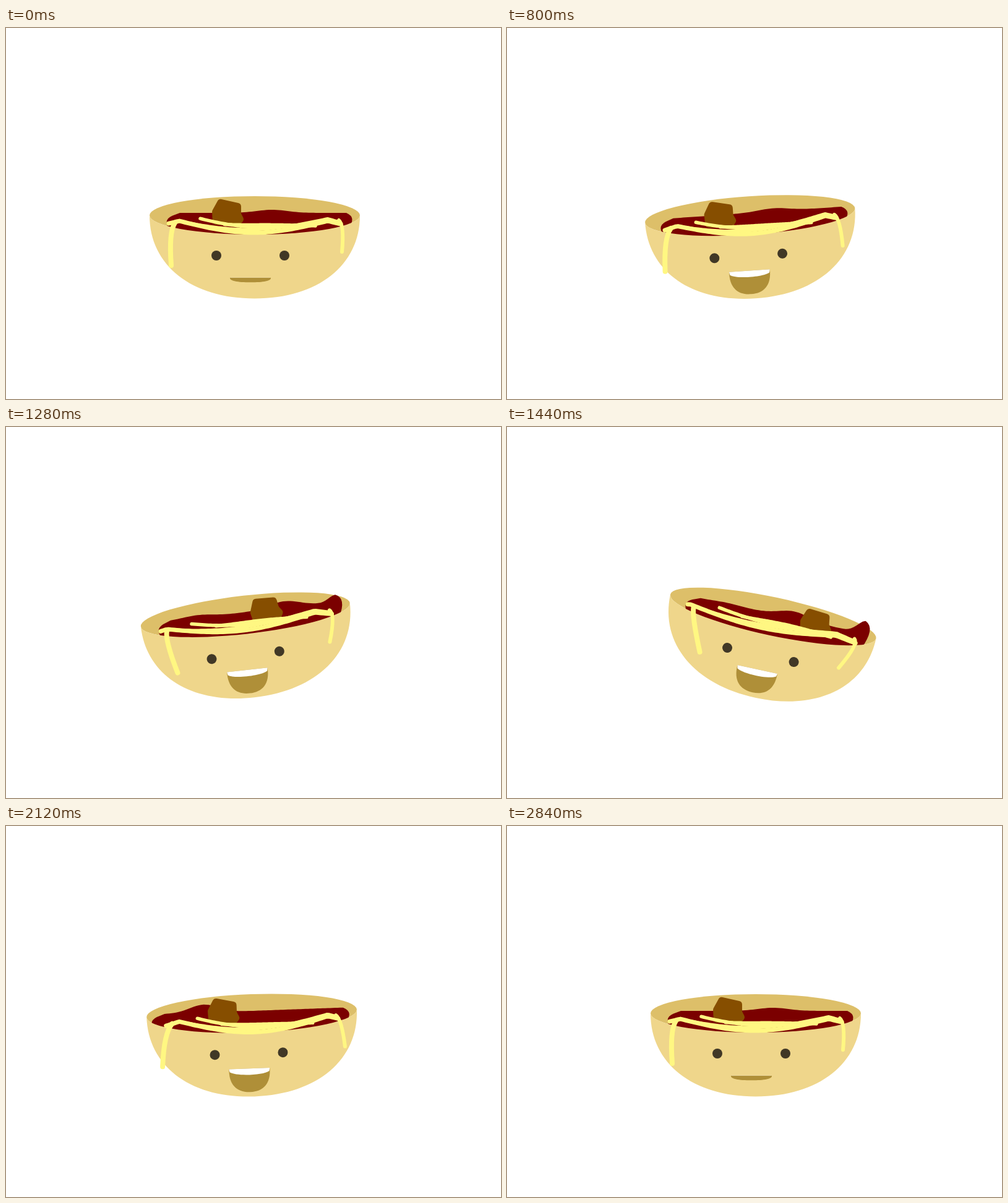
Recreate the animation shown at these times as an HTML page with a canvas. Size 800 px wide and 600 px high, loop 2880 ms.

```html
<!DOCTYPE html>
<html lang="en">
<head>
<meta charset="utf-8">
<title>Noodle bowl</title>
<style>
html, body { margin: 0; width: 100%; height: 100%; overflow: hidden; background: #fff; }
canvas { display: block; }
</style>
</head>
<body>
<canvas id="stage" width="800" height="600"></canvas>
<script>
const ctx = document.getElementById('stage').getContext('2d');
const LOOP = 2880, STEP = 40;
const PIVOT = { x: 400, y: 438 };
const BOWL = { x: 402, y: 303, rx: 170, rim: 31, depth: 134.5, roundness: 0.6 };

// Rocking in degrees at each turning point
const TILT = [[0, 0], [560, 0], [810, -3.95], [1020, 6.2], [1225, -9.5], [1450, 12.2], [1630, -8.6],
  [1815, 7], [2052, -3.9], [2252, 3.1], [2450, -1.8], [2640, 0.8], [2800, 0], [LOOP, 0]];
const MOUTH = [[0, 0], [320, 0], [600, 1], [2520, 1], [2800, 0], [LOOP, 0]];

// The contents trail behind the bowl: wave heights, shift of the meat, swing of the loose ends
const REST = { edge: 259, left: 0, hump: 5, humpX: 430, splash: 0, meat: 0, spin: 0, swing: 0 };
const SLOSH = [
  [0, REST], [480, REST],
  [800, { ...REST, edge: 256, humpX: 440, meat: -5, swing: -8 }],
  [1080, { ...REST, left: 7, hump: 10, humpX: 514, meat: 26, spin: -14, swing: -6 }],
  [1440, { ...REST, left: 2, hump: 11, humpX: 434, splash: 20, meat: 113, spin: -8, swing: 31 }],
  [1720, { ...REST, edge: 241, left: 7, hump: 4, splash: 13, meat: 39, spin: 28, swing: -10 }],
  [2120, { ...REST, edge: 239, left: 13, hump: 0, meat: -2, swing: -12 }],
  [2760, REST], [LOOP, REST]];

// Each strand: ends in x, then how far it lies above the sagging main strand
const STRANDS = [
  { from: 263, to: 541, start: 0, middle: 0, end: 0, width: 7 },
  { from: 290, to: 535, start: 0, middle: 4, end: 3, width: 5 },
  { from: 314, to: 528, start: 12, middle: 2, end: 0, width: 5.5 },
  { from: 353, to: 500, start: 10, middle: 8, end: -3, width: 5.5 }];
const CHUNK = [[-24, 20], [-25, -2], [-14, -22], [22, -14], [22, 2], [27, 12], [20, 21]];

const mix = (a, b, u) => a + (b - a) * u;
const bump = (x, center, width) => Math.exp(-(((x - center) / width) ** 2));

// Eased value between the two keys around t; works on numbers and on states
function valueAt(keys, t) {
  const i = keys.findIndex(key => key[0] > t);
  const [t0, a] = keys[i - 1], [t1, b] = keys[i];
  const u = (1 - Math.cos(Math.PI * (t - t0) / (t1 - t0))) / 2;
  if (typeof a === 'number') return mix(a, b, u);
  return Object.fromEntries(Object.keys(a).map(k => [k, mix(a[k], b[k], u)]));
}

function fill(color, path) {
  ctx.fillStyle = color;
  path ? ctx.fill(path) : ctx.fill();
}
function stroke(width) {
  ctx.lineWidth = width;
  ctx.stroke();
}

function drawRim() {
  ctx.beginPath();
  ctx.ellipse(BOWL.x, BOWL.y, BOWL.rx, BOWL.rim, 0, 0, 2 * Math.PI);
  fill('#ddbf69');
}

function drawSoup(s) {
  const level = x => 299 - s.left * bump(x, 325, 32) - s.hump * bump(x, s.humpX, 35)
    - s.splash * bump(x, 550, 16);
  const first = s.edge + 14, last = 550;
  ctx.beginPath();
  ctx.moveTo(s.edge + 4, 324);
  ctx.quadraticCurveTo(s.edge - 6, 308, first, level(first) + 3);
  for (let x = first + 8; x < last; x += 4) ctx.lineTo(x, level(x));
  ctx.lineTo(last, level(last));
  ctx.quadraticCurveTo(568, level(last) + 8, 552, 324);
  ctx.lineTo(BOWL.x, 345);
  fill('#7b0000');
}

function drawMeat(s) {
  const [a, b] = [CHUNK[0], CHUNK[CHUNK.length - 1]];
  ctx.save();
  ctx.translate(358 + s.meat, 298);
  ctx.rotate(s.spin * Math.PI / 180);
  ctx.beginPath();
  ctx.moveTo((a[0] + b[0]) / 2, (a[1] + b[1]) / 2);
  CHUNK.forEach((p, i) => ctx.arcTo(...p, ...CHUNK[(i + 1) % CHUNK.length], 6));
  ctx.closePath();
  fill('#864e00');
  ctx.restore();
}

function drawFront() {
  const { x, y, rx, rim, depth, roundness: k } = BOWL;
  ctx.beginPath();
  ctx.ellipse(x, y, rx, rim, 0, Math.PI, 0, true);
  ctx.bezierCurveTo(x + rx, y + depth * k, x + rx * k, y + depth, x, y + depth);
  ctx.bezierCurveTo(x - rx * k, y + depth, x - rx, y + depth * k, x - rx, y);
  fill('#efd68b');
}

function drawNoodles(s) {
  const sag = 19 - 0.2 * s.swing, drift = -0.4 * s.swing;
  ctx.strokeStyle = '#fff782';
  ctx.lineCap = ctx.lineJoin = 'round';
  for (const { from, to, start, middle, end, width } of STRANDS) {
    ctx.beginPath();
    for (let u = 0; u <= 1; u += 1 / 64) {
      const x = mix(from, to, u);
      const lift = mix(start, end, u) + middle * Math.sin(Math.PI * u);
      ctx.lineTo(x, 312 + sag * Math.abs(Math.sin(Math.PI * (x - drift - 280) / 240)) - lift);
    }
    stroke(width);
  }
  ctx.beginPath();
  ctx.moveTo(273, 315);
  ctx.quadraticCurveTo(263 + s.swing / 3, 330, 267 + s.swing, 384);
  stroke(8);
  ctx.beginPath();
  ctx.moveTo(538, 311);
  ctx.quadraticCurveTo(547, 318, 543 - 0.65 * s.swing, 362);
  stroke(6);
}

function drawFace(open) {
  for (const x of [340, 450]) {
    ctx.beginPath();
    ctx.arc(x, 368, 8, 0, 2 * Math.PI);
    fill('#413826');
  }
  const size = mix(0.2, 1, open);
  ctx.save();
  ctx.translate(395, mix(403.7, 392, open));
  ctx.scale(1, size);
  fill('#af8f38', new Path2D('M-33 0H33C34 26 21 38 0 38S-34 26-33 0Z'));
  ctx.scale(1, size);
  fill('#fff', new Path2D('M-33 0H33L32 5C22 12-22 12-32 5Z'));
  ctx.restore();
}

function draw(now) {
  const t = Math.floor(now % LOOP / STEP) * STEP;
  const state = valueAt(SLOSH, t);
  ctx.clearRect(0, 0, 800, 600);
  ctx.save();
  ctx.translate(PIVOT.x, PIVOT.y);
  ctx.rotate(valueAt(TILT, t) * Math.PI / 180);
  ctx.translate(-PIVOT.x, -PIVOT.y);
  drawRim();
  drawSoup(state);
  drawMeat(state);
  drawFront();
  drawNoodles(state);
  drawFace(valueAt(MOUTH, t));
  ctx.restore();
}

const start = performance.now();
function tick() {
  draw(performance.now() - start);
  requestAnimationFrame(tick);
}
tick();
</script>
</body>
</html>
```
